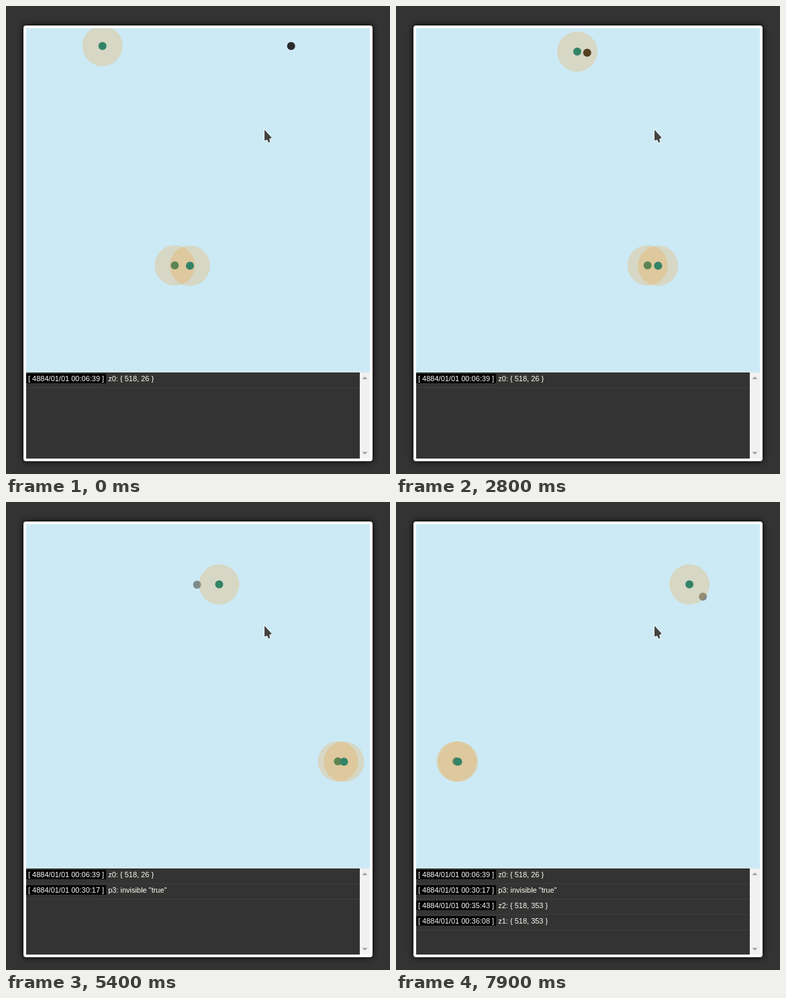
An HTML page for the animation above (8000 ms loop, 572x696 px).

```html
<!DOCTYPE html>
<html lang="en">
<head>
<meta charset="utf-8">
<title>Chase simulation</title>
<style>
html, body { margin: 0; width: 100%; height: 100%; overflow: hidden; background: #333; }
.card {
  position: absolute; left: 26px; top: 29px; width: 512px; height: 640px;
  border: 4px solid #fff; border-radius: 4px; box-shadow: 0 0 10px #000; background: #333;
}
#log { position: absolute; left: 0; top: 512px; width: 497px; }
.row {
  height: 22px; border-bottom: 1px solid #3e3e3e; white-space: nowrap;
  font: 11px/18px "Liberation Sans", Arial, sans-serif; color: #fffff4;
}
.row span { padding: 1px 3px; background: #000; color: #fff; }
svg { position: absolute; left: 0; top: 0; display: block; }
</style>
</head>
<body>
<div class="card"><div id="log"></div></div>
<svg width="572" height="696" viewBox="0 0 572 696">
  <clipPath id="field"><rect x="30" y="33" width="512" height="512"/></clipPath>
  <rect x="30" y="33" width="512" height="512" fill="#cceaf5"/>
  <g id="actors" clip-path="url(#field)"></g>
  <rect x="527" y="545" width="15" height="128" fill="#f1f1f1"/>
  <path d="M530.5 555 l4 -4 l4 4z M530.5 663 l4 4 l4 -4z" fill="#a3a3a3"/>
  <path d="M385 184 V200 L389 199 L391.4 203.2 L393.2 202.4 L392.4 197.6 L396 196 Z" fill="#444"
        stroke="#fff" stroke-width="1.6" paint-order="stroke"/>
</svg>
<script>
const LOOP = 8000, TICK = 100;
const STEP = 6.56, SHORT_STEP = 0.45 * STEP;
const INVISIBLE_AT = 212;

// Redraws come in bursts of four ticks, then a pause; the last step of a burst is shorter.
function isHeld(tick) {
  if (tick < 5) return tick === 1 || tick === 3;
  return tick % 5 === (tick < 25 ? 4 : 0) && tick !== 55;
}

function travelAt(tick) {
  let travel = 0;
  for (let i = 1; i <= tick; i++) {
    if (!isHeld(i)) travel += i > 4 && isHeld(i + 1) ? SHORT_STEP : STEP;
  }
  return travel;
}

// Waypoints: [travel, x, y].
const hunterPath = [
  [0, 143.7, 59.5], [104, 249, 59.5], [123.3, 270, 67.7], [148.9, 284.6, 83],
  [188.8, 285, 122.6], [210.5, 285, 122.6], [362.8, 437.1, 122.6]
];
const playerPath = [
  [6.6, 424.7, 59.5], [17, 435, 59.5], [22, 427, 70.5], [116.7, 284.8, 69.5],
  [123.3, 284.8, 69.5], [182, 284.6, 123], [247, 284.6, 123], [362.8, 457.2, 140.7]
];

function along(path, travel) {
  let i = 0;
  while (i < path.length - 2 && path[i + 1][0] <= travel) i++;
  const [t0, x0, y0] = path[i], [t1, x1, y1] = path[i + 1];
  const k = Math.max(0, Math.min(1, (travel - t0) / (t1 - t0)));
  return [x0 + (x1 - x0) * k, y0 + (y1 - y0) * k];
}

const actors = document.getElementById("actors");
const log = document.getElementById("log");

function add(parent, tag, attrs = {}) {
  const el = document.createElementNS("http://www.w3.org/2000/svg", tag);
  for (const name in attrs) el.setAttribute(name, attrs[name]);
  return parent.appendChild(el);
}

function makeZombie() {
  const g = add(actors, "g");
  add(g, "circle", { r: 6, fill: "teal" });
  add(g, "circle", { r: 30, fill: "darkorange", "fill-opacity": 0.2 });
  return g;
}

function makeRow(clock, message, since) {
  const row = document.createElement("div");
  const stamp = document.createElement("span");
  row.className = "row";
  stamp.textContent = `[ 4884/01/01 ${clock} ]`;
  row.append(stamp, " " + message);
  log.append(row);
  return { row, since };
}

const player = add(actors, "circle", { r: 6, fill: "#2a2a2a" });
const [z0, z1, z2] = [0, 1, 2].map(makeZombie);
const rows = [
  makeRow("00:06:39", "z0: { 518, 26 }", 0),
  makeRow("00:30:17", 'p3: invisible "true"', INVISIBLE_AT),
  makeRow("00:35:43", "z2: { 518, 353 }", 290.3),
  makeRow("00:36:08", "z1: { 518, 353 }", 296.6)
];

const place = (el, x, y) => el.setAttribute("transform", `translate(${x} ${y})`);
const wrap = x => x >= 548 ? x - 524 : x;

function draw(ms) {
  const travel = travelAt(Math.floor((ms % LOOP) / TICK));
  place(player, ...along(playerPath, travel));
  player.setAttribute("fill-opacity", travel >= INVISIBLE_AT ? 0.5 : 1);
  place(z0, ...along(hunterPath, travel));
  place(z1, wrap(251.4 + travel), 385.7);
  place(z2, wrap(274 + 0.944 * travel), 386.3);
  for (const { row, since } of rows) {
    row.style.visibility = travel >= since ? "visible" : "hidden";
  }
}

const start = performance.now();
function loop() {
  draw(performance.now() - start);
  requestAnimationFrame(loop);
}
loop();
</script>
</body>
</html>
```
